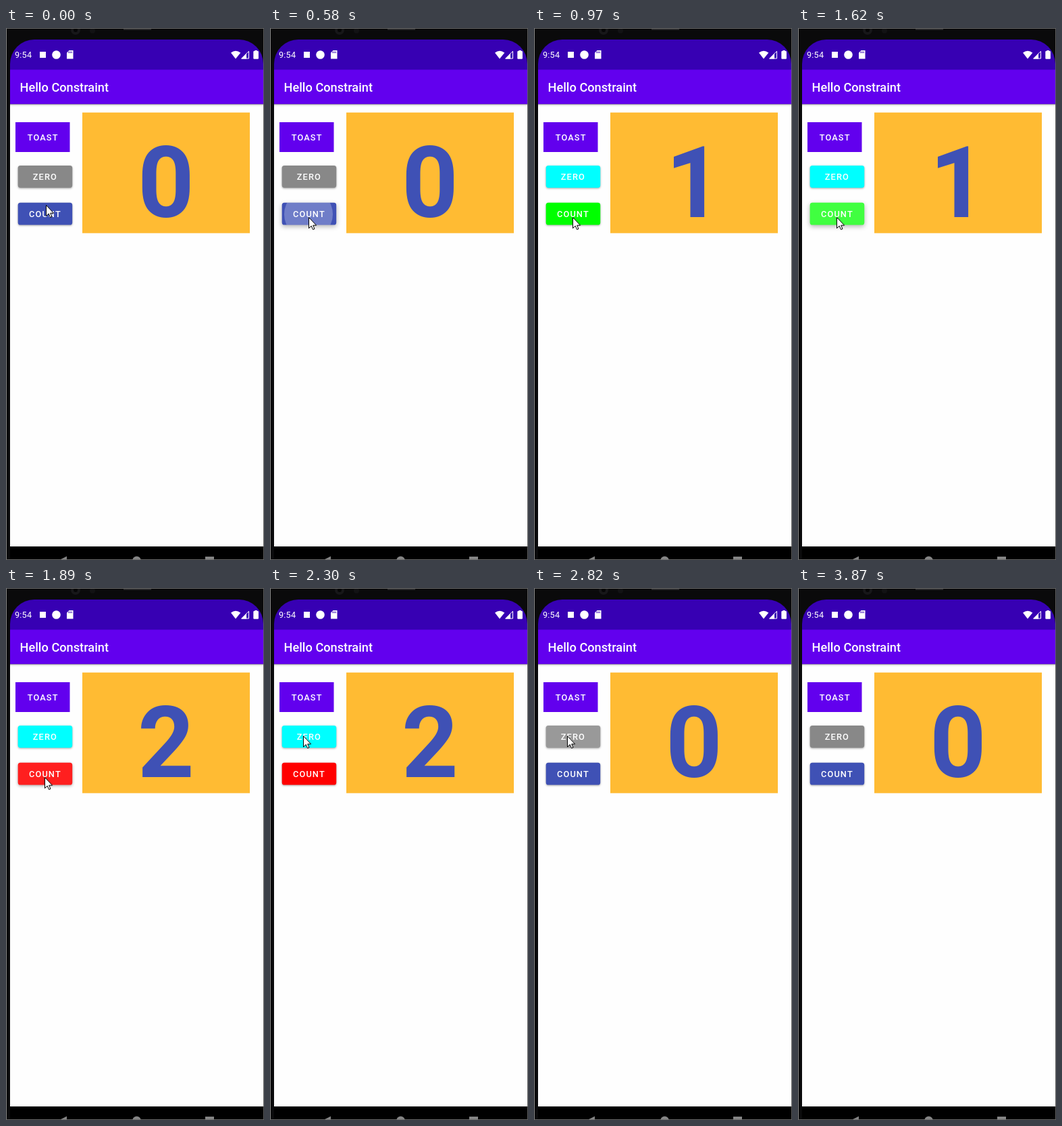
An HTML page with a canvas that plays this animation: 382x785 px, repeating every 4.74 s.

```html
<!DOCTYPE html>
<html lang="en">
<head>
<meta charset="utf-8">
<title>Hello Constraint</title>
<style>
html, body { margin: 0; width: 100%; height: 100%; overflow: hidden; background: #000; }
canvas { display: block; }
</style>
</head>
<body>
<canvas id="stage" width="382" height="785"></canvas>
<script>
const ctx = document.getElementById('stage').getContext('2d');
const LOOP = 4740;
const BLUE = '#3f51b5', GREY = '#888888', CYAN = '#00ffff', GREEN = '#00ff00', RED = '#ff0000';

// [start ms, x, y]; the pointer jumps between these places
const pointer = [
  [0, 59, 261], [140, 58, 272], [270, 57, 279], [2010, 57, 274], [2160, 53, 227],
  [2300, 49, 218], [3280, 168, 356], [3430, 273, 643], [3720, 304, 747], [3870, -50, -50]
];
// [start ms, digit, zero colour, count colour]
const counter = [
  [0, '0', GREY, BLUE], [700, '1', CYAN, GREEN], [1740, '2', CYAN, RED], [2700, '0', GREY, BLUE]
];
// [start ms, button, ripple opacity, ripple radius, lift]
const touch = [
  [0, '', 0, 0, 0],
  [580, 'count', .25, 36, 1], [700, 'count', .25, 60, 1], [820, 'count', .12, 60, 0], [970, '', 0, 0, 0],
  [1620, 'count', .25, 60, 1], [1740, 'count', .25, 60, 1], [1890, 'count', .12, 60, .3], [2010, '', 0, 0, 0],
  [2580, 'zero', .25, 36, 1], [2700, 'zero', .25, 60, 1], [2820, 'zero', .14, 60, 0], [2970, '', 0, 0, 0]
];
const at = (track, t) => track.filter(k => k[0] <= t).pop();

function rect(x, y, w, h, fill) {
  ctx.fillStyle = fill;
  ctx.fillRect(x, y, w, h);
}
function poly(points, fill, stroke) {
  ctx.beginPath();
  points.forEach(([x, y]) => ctx.lineTo(x, y));
  ctx.closePath();
  if (fill) { ctx.fillStyle = fill; ctx.fill(); }
  if (stroke) { ctx.strokeStyle = stroke; ctx.lineWidth = 1; ctx.stroke(); }
}
function disc(x, y, r, fill) {
  ctx.beginPath();
  ctx.arc(x, y, r, 0, Math.PI * 2);
  ctx.fillStyle = fill;
  ctx.fill();
}
function text(str, x, y, size, weight, spacing = 0, fill = '#fff') {
  ctx.font = `${weight} ${size}px Roboto, sans-serif`;
  ctx.letterSpacing = spacing + 'px';
  ctx.fillStyle = fill;
  ctx.fillText(str, x, y);
}

function phone() {
  rect(0, 0, 382, 785, '#0a0a0b');
  rect(174, 0, 41, 3, '#2b2b2d');
  disc(103, 3, 7, '#171719');
  disc(103, 3, 3, '#050506');
  disc(128, 4, 4, '#121214');

  ctx.save();
  ctx.beginPath();
  ctx.roundRect(6, 17, 375, 800, 36);
  ctx.clip();
  rect(6, 17, 375, 45, '#3700b3');
  rect(6, 61.5, 375, 51, '#6200ee');
  rect(6, 112.5, 375, 653, '#fefefe');
  const shade = ctx.createLinearGradient(0, 112, 0, 116);
  shade.addColorStop(0, 'rgba(0,0,0,.2)');
  shade.addColorStop(1, 'rgba(0,0,0,0)');
  rect(6, 112.5, 375, 3.5, shade);
  rect(6, 765, 375, 20, '#000');
  ctx.restore();

  poly([[79, 785], [90, 779.5], [90, 785]], '#858585');
  disc(193.5, 786, 6.5, '#858585');
  rect(295, 780, 13, 5, '#858585');

  rect(0, 0, 1, 785, '#8a8a8a');
  rect(0, 0, 382, 1, '#6a6a6a');
  rect(0, 784, 382, 1, '#6a6a6a');
  rect(381, 0, 1, 785, '#5c5c5c');
}

function statusBar() {
  text('9:54', 13, 44, 12.7, 400, .2);
  rect(50, 35, 9, 9, '#fff');
  disc(74.5, 39.5, 6.3, '#fff');
  poly([[90, 36.5], [93.5, 33], [99.5, 33], [99.5, 45.5], [90, 45.5]], '#fff');
  for (let i = 0; i < 3; i++) rect(92.4 + i * 2.1, 34.5, 1, 2.6, '#3700b3');

  ctx.beginPath();
  ctx.moveTo(340, 45.5);
  ctx.lineTo(333, 36.5);
  ctx.quadraticCurveTo(340, 31, 347.3, 36.5);
  ctx.fillStyle = '#fff';
  ctx.fill();
  poly([[348.8, 45], [359.5, 45], [359.5, 34.3]], null, '#fff');
  poly([[348, 45.5], [356, 45.5], [356, 37.5]], '#fff');
  rect(368.3, 33, 3.6, 2, '#fff');
  ctx.beginPath();
  ctx.roundRect(366.3, 34, 7.6, 11.8, 1);
  ctx.fill();
}

function button(label, x, y, textX, fill, press) {
  const lift = press ? press[4] : 0;
  ctx.save();
  ctx.shadowColor = `rgba(0,0,0,${.35 - lift * .05})`;
  ctx.shadowBlur = 3 + lift * 4;
  ctx.shadowOffsetY = 1 + lift * 1.5;
  ctx.beginPath();
  ctx.roundRect(x, y, 80.5, 32.7, 3.6);
  ctx.fillStyle = fill;
  ctx.fill();
  ctx.restore();
  if (press) {
    ctx.save();
    ctx.clip();
    disc(57, y + 17, press[3], `rgba(255,255,255,${press[2]})`);
    ctx.restore();
  }
  text(label, textX, y + 21.2, 12.75, 500, 1.14);
}

function arrow(x, y) {
  const shape = [[.5, .5], [.5, 16.5], [4.2, 13], [6.6, 18.4], [9, 17.4], [6.7, 12.2], [11.6, 12.2]];
  ctx.save();
  ctx.beginPath();
  ctx.rect(0, 0, 382, 765);
  ctx.clip();
  poly(shape.map(([a, b]) => [x + a, y + b]), '#fff', '#000');
  ctx.restore();
}

function draw(t) {
  const [, digit, zeroFill, countFill] = at(counter, t);
  const press = at(touch, t);
  const pressOn = name => press[1] === name ? press : null;
  const [, px, py] = at(pointer, t);

  phone();
  statusBar();
  text('Hello Constraint', 20.5, 94, 18.2, 500);

  rect(14, 139, 80.5, 44, '#6200ee');
  text('TOAST', 31.7, 166, 12.75, 500, 1.14);
  button('ZERO', 17.7, 203, 39.8, zeroFill, pressOn('zero'));
  button('COUNT', 17.7, 257.8, 34, countFill, pressOn('count'));

  rect(113, 124.7, 248, 178, '#ffbb33');
  ctx.textAlign = 'center';
  text(digit, 237, 279, 146, 700, 0, BLUE);
  ctx.textAlign = 'left';

  arrow(px, py);
}

const start = performance.now();
function frame() {
  draw((performance.now() - start) % LOOP);
  requestAnimationFrame(frame);
}
frame();
</script>
</body>
</html>
```
